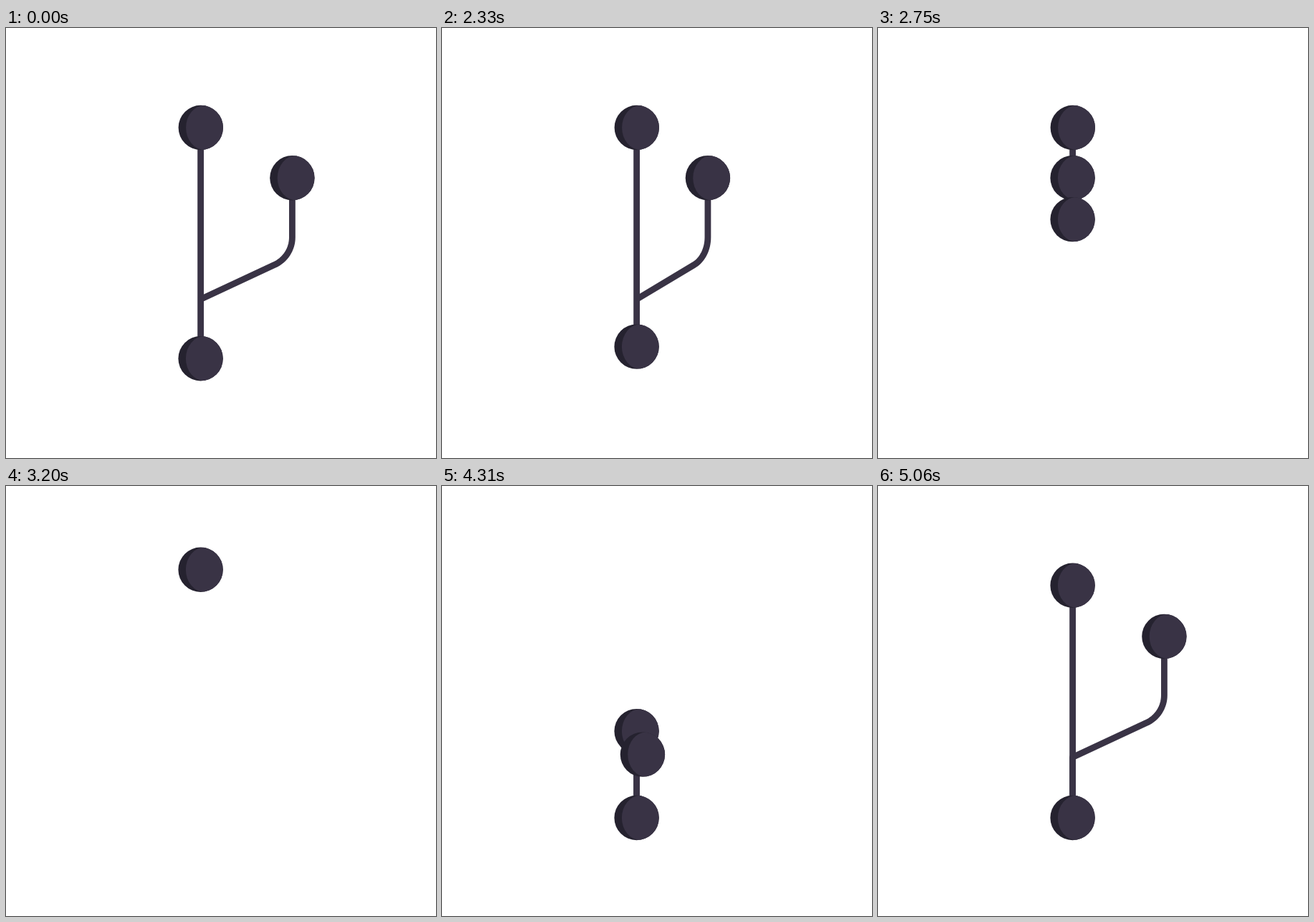
Recreate the animation shown at these times as an HTML page with a canvas. Size 600x600 px, loop 5120 ms.

```html
<!DOCTYPE html>
<html lang="en">
<head>
<meta charset="utf-8">
<title>Branch</title>
<style>
html, body { margin: 0; width: 100%; height: 100%; overflow: hidden; background: #fff; }
canvas { display: block; width: 600px; height: 600px; }
</style>
</head>
<body>
<canvas id="stage" width="600" height="600"></canvas>
<script>
const ctx = document.getElementById('stage').getContext('2d');
const LOOP = 5120, HOLD = 2030, STEP = 30, LAST = 5060;
const FACE = '#393345', RIM = '#25222f';
const R = 31.2, X = 271.6, SIDE_X = 399.4;
const TOP = 139, SIDE = 209.2, LOW = 461.2, LAND = 463, APEX = 115, FORK = 378.5;
const clamp = v => Math.max(0, Math.min(1, v));
const span = (t, from, to) => clamp((t - from) / (to - from));
const easeOut = (p, n) => 1 - Math.pow(1 - p, n);

// Side branch: diagonal, rounded corner, vertical part
function branch(endY) {
  const cornerY = FORK - 0.466 * (SIDE_X - X), reach = 27, r = reach * Math.tan(57.5 * Math.PI / 180);
  const pts = [[X, FORK]];
  const cx = SIDE_X - r, cy = cornerY - reach;
  for (let i = 0; i <= 16; i++) {
    const a = (65 - 65 * i / 16) * Math.PI / 180;
    pts.push([cx + r * Math.cos(a), cy + r * Math.sin(a)]);
  }
  pts.push([SIDE_X, endY]);
  return pts;
}

const gap = (a, b) => Math.hypot(b[0] - a[0], b[1] - a[1]);
const mix = (a, b, k) => [a[0] + (b[0] - a[0]) * k, a[1] + (b[1] - a[1]) * k];

function trim(pts, part) {
  let left = part * pts.reduce((sum, p, i) => sum + (i ? gap(pts[i - 1], p) : 0), 0);
  const out = [pts[0]];
  for (let i = 1; i < pts.length; i++) {
    const d = gap(pts[i - 1], pts[i]);
    if (d >= left) {
      out.push(mix(pts[i - 1], pts[i], left / d));
      break;
    }
    out.push(pts[i]);
    left -= d;
  }
  return out;
}

function line(pts) {
  ctx.beginPath();
  pts.forEach(p => ctx.lineTo(p[0], p[1]));
  ctx.strokeStyle = FACE;
  ctx.lineWidth = 8.8;
  ctx.lineJoin = 'round';
  ctx.stroke();
}

function ball(x, y, sx = 1) {
  ctx.save();
  ctx.translate(x, y);
  ctx.scale(sx, 1);
  ctx.beginPath();
  ctx.arc(0, 0, R, 0, 7);
  ctx.fillStyle = RIM;
  ctx.fill();
  ctx.clip();
  ctx.beginPath();
  ctx.ellipse(5.3, 0, 26, R, 0, 0, 7);
  ctx.fillStyle = FACE;
  ctx.fill();
  ctx.restore();
}

function collapse(t) {
  const low = LOW - (LOW - TOP) * Math.pow(span(t, 2000, 2888), 3);
  const width = 1 - Math.pow(span(t, 2000, 2632), 2.31);
  const sideX = X + (SIDE_X - X) * width;
  line([[X, low], [X, TOP]]);
  ctx.save();
  ctx.beginPath();
  ctx.rect(0, 0, 600, low);
  ctx.clip();
  line(branch(SIDE).map(p => [X + (p[0] - X) * width, p[1]]));
  ctx.restore();
  ball(X + 0.2, TOP);
  ball(sideX, Math.min(SIDE, low));
  ball(X, low);
}

function drop(t) {
  const mid = 3718;
  const rise = Math.sin(span(t, 2888, 3302) * Math.PI / 2);
  const fall = t < mid ? 0.5 * Math.exp((t - mid) * 0.0292) : 1 - 0.5 * Math.exp((mid - t) * 0.0395);
  const from = TOP + (APEX - TOP) * rise;
  const thin = 0.12 * Math.exp(-Math.pow((t - 3740) / 76, 2));
  ball(X, from + (LAND - from) * fall, 1 - thin);
}

function spread(t) {
  const p = span(t, 4186, 5100);
  const top = LAND + (TOP - 0.3 - LAND) * easeOut(p, 3.2);
  const path = trim([[X, LAND], ...branch(SIDE + 0.5)], easeOut(p, 2.3));
  const tip = path[path.length - 1];
  line([[X, LAND], [X, top]]);
  line(path);
  ball(X, top);
  ball(tip[0], tip[1]);
  ball(X, LAND);
}

function draw(now) {
  const raw = now % LOOP;
  const t = raw < HOLD ? 0 : Math.min(LAST, HOLD + Math.floor((raw - HOLD) / STEP) * STEP);
  ctx.clearRect(0, 0, 600, 600);
  if (t < 2888) collapse(t);
  else if (t < 4186) drop(t);
  else spread(t);
}

let start;
function tick(now) {
  if (start === undefined) start = now;
  draw(now - start);
  requestAnimationFrame(tick);
}
draw(0);
requestAnimationFrame(tick);
</script>
</body>
</html>
```
